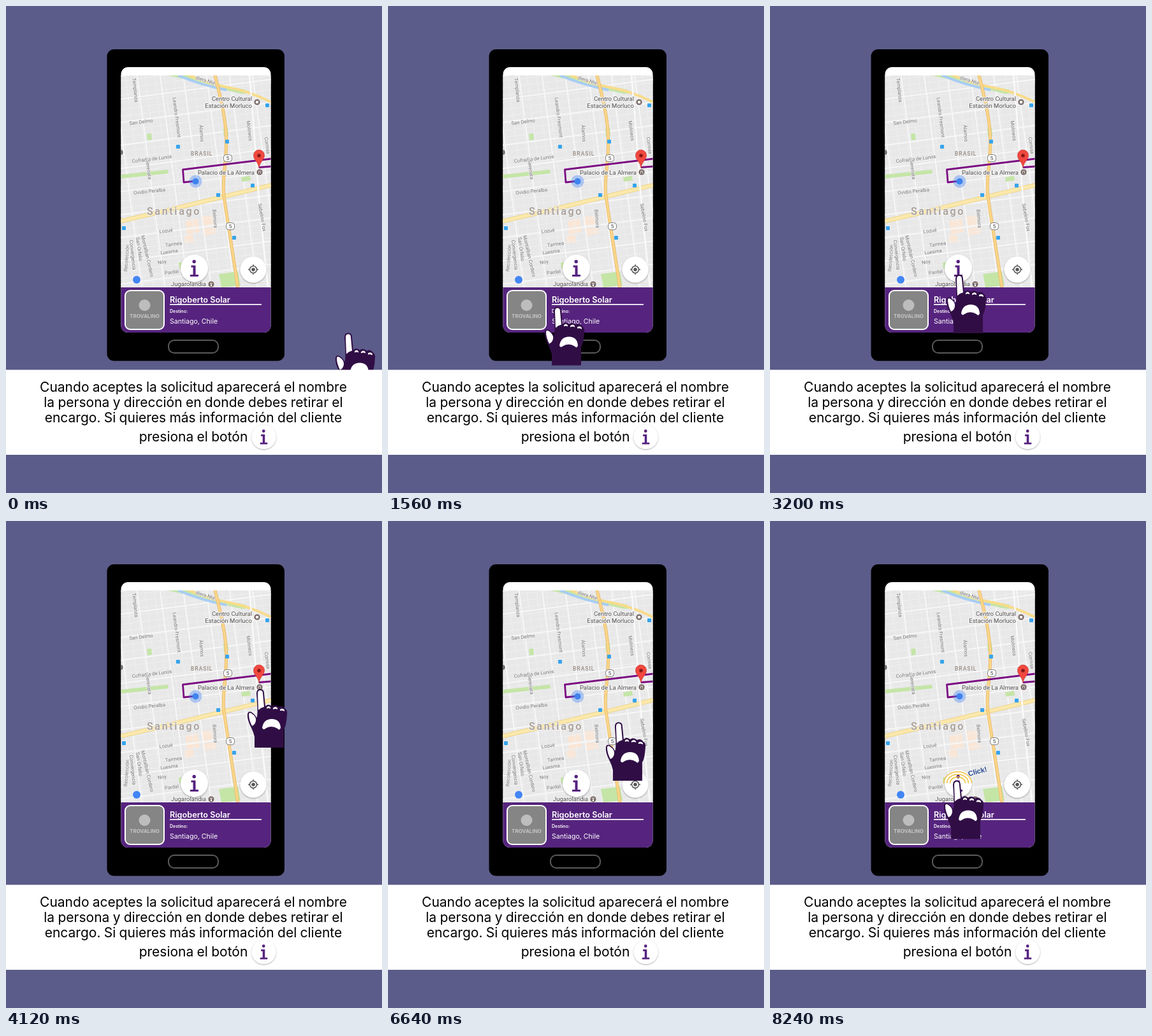
An HTML page that plays this animation: 590x765 px, repeating every 8520 ms.

```html
<!DOCTYPE html>
<html lang="es">
<head>
<meta charset="utf-8">
<style>
html, body { margin: 0; height: 100%; overflow: hidden; background: #5c5c8a; }
svg { display: block; width: 590px; height: 765px; }
text { font-family: Inter, sans-serif; }
.mid, #labels text { text-anchor: middle; }
#labels text, .poi text { font-family: Roboto, sans-serif; }
#labels text { font-size: 7.8px; fill: #77777a; stroke: #f1f1f1; stroke-width: 1.5px; paint-order: stroke; }
.poi text { font-size: 9.5px; fill: #55504f; text-anchor: end; stroke: #f3f3f3; stroke-width: 2px; paint-order: stroke; }
.line { fill: none; }
</style>
</head>
<body>
<svg viewBox="0 0 590 765">
  <defs>
    <clipPath id="screen"><rect x="180.5" y="96" width="235" height="417" rx="11"/></clipPath>
    <clipPath id="mapArea"><rect x="180" y="109" width="236" height="333"/></clipPath>
    <filter id="shadow" x="-30%" y="-30%" width="160%" height="160%">
      <feDropShadow dx="0" dy="1" stdDeviation="1.3" flood-opacity=".4"/>
    </filter>
    <g id="info">
      <circle r="21.5" fill="#fff" filter="url(#shadow)"/>
      <path d="M-5-4.500H2V10H6.500V13H-6.500V10H-2V-1.500H-5z" fill="#56217f"/>
      <circle cx="-.3" cy="-10.500" r="2.700" fill="#56217f"/>
    </g>
    <path id="highway" d="M327 105C335 138 344 170 345.500 205S339 275 341.500 295 349 345 353 371 360 415 364 444"/>
    <path id="avenue" d="M180 338L250 321.500 335 301 416 281.500"/>
  </defs>
  <rect width="590" height="765" fill="#5c5c8a"/>
  <rect x="158.5" y="68" width="278.5" height="489.5" rx="11"/>
  <rect class="line" x="255" y="525" width="78" height="20" rx="9" stroke="#5a5a5a" stroke-width="2"/>

  <g clip-path="url(#screen)">
    <rect x="180" y="96" width="236" height="418" fill="#fff"/>
    <g clip-path="url(#mapArea)">
      <rect x="180" y="109" width="236" height="333" fill="#e8e8e9"/>
      <g fill="#fae6d6">
        <path d="M281 337l20-4 3 22-20 4zM306 331l20-3 3 17-20 4zM309 350l20-3 2 10-20 4zM279 361l14-2 2 12-14 2z"/>
      </g>
      <path id="minor" class="line" stroke="#efefef"/>
      <path id="major" class="line" stroke="#f8f8f8" stroke-width="1.8"/>
      <g fill="#c5e5a7">
        <path d="M254 109h34l58 18 28 4 10 6-14 1-30-7-42-12zM180 265l74-8 1 6-75 8zM221 201l7-1 1 10-7 1zM341 193l7-1 1 12-7 1zM334 421l30-4 4 22-30 3zM271 403l9-1 1 9-9 1zM369 269l14-2 1 7-14 2z"/>
      </g>
      <path class="line" d="M270 109Q305 124 346 132" stroke="#a8cdf5" stroke-width="4"/>
      <g class="line">
        <path d="M276 103Q310 121 345 127T416 151" stroke="#f8dc8b" stroke-width="4"/>
        <use href="#avenue" stroke="#edd58c" stroke-width="7"/>
        <use href="#avenue" stroke="#fbe8ac" stroke-width="5"/>
        <use href="#highway" stroke="#e9b95f" stroke-width="5"/>
        <use href="#highway" stroke="#fad58b" stroke-width="3.4"/>
        <path d="M382 109Q389 190 393 250T411 442" stroke="#fafafa" stroke-width="2.5"/>
      </g>
      <circle cx="179.5" cy="230" r="4" fill="#66605f"/>
      <g id="stations" fill="#36a4ed"></g>
      <g id="labels"></g>
      <g class="mid" font-size="8" fill="#444">
        <g fill="#fff" stroke="#777"><rect x="341.5" y="233.5" width="13" height="11" rx="4"/><rect x="345.5" y="340.5" width="13" height="11" rx="4"/></g>
        <text x="348" y="242">5</text><text x="352" y="349">5</text>
      </g>
      <text x="290" y="235" style="font:500 8.5px Roboto,sans-serif;letter-spacing:1px" fill="#998b80">BRASIL</text>
      <text x="221" y="328" style="font:500 16px Roboto,sans-serif;letter-spacing:2.7px" fill="#a79d95" stroke="#eee" stroke-width="2" paint-order="stroke">Santiago</text>
      <path class="line" d="M297 275L279 277 277.500 257 416 240M397 253.500L416 252" stroke="#7b0b82" stroke-width="2.8" stroke-linejoin="round"/>
      <g class="poi">
        <text x="386" y="149">Centro Cultural</text><text x="386" y="160">Estación Morluco</text>
        <text x="390" y="264.5">Palacio de La Almera</text><text x="314" y="440">Jugarolandia</text>
        <g fill="#7b6c68" stroke="#fff" stroke-width=".7"><circle cx="394" cy="151" r="5"/><circle cx="398" cy="261" r="5"/><circle cx="322" cy="437" r="5"/></g>
        <path d="M392 149h4v4h-4zM396 259h4v1h-4zM396 261h1v2h-1zM399 261h1v2h-1zM320 435h4v1h-4zM321 437h2v3h-2z" fill="#fff"/>
      </g>
      <circle cx="297.5" cy="275.5" r="10" fill="#4285f4" opacity=".38"/>
      <circle cx="297.5" cy="275.5" r="5" fill="#3f83ee"/>
      <path d="M397 254C396 245 388.500 242 388.500 234.500a8.500 8.500 0 0 1 17 0C405.500 242 398 245 397 254z" fill="#f0483f" stroke="#ca3530" stroke-width=".7"/>
      <circle cx="397" cy="235" r="2.8" fill="#861817"/>
      <circle cx="205" cy="430" r="6" fill="#4285f4"/>
    </g>

    <rect x="180" y="442" width="236" height="72" fill="#56247e"/>
    <rect x="187" y="447" width="61" height="61" rx="8" fill="#858585" stroke="#fff" stroke-width="2"/>
    <circle cx="217.5" cy="470" r="9" fill="#bdbdbd"/>
    <text class="mid" x="217.5" y="490" font-size="8" font-weight="700" fill="#c4c4c4">TROVALINO</text>
    <g fill="#fff">
      <text x="257" y="466" font-size="12.7" font-weight="600">Rigoberto Solar</text>
      <rect x="257" y="468" width="144" height="1.7"/>
      <text x="257" y="482" font-size="7" font-weight="600">Destino:</text>
      <text x="257" y="499" font-size="10.6">Santiago, Chile</text>
    </g>
    <use href="#info" transform="translate(295.5 412)"/>
    <circle cx="388" cy="414" r="20.5" fill="#fff" filter="url(#shadow)"/>
    <path class="line" d="M388 406v2.500M388 419.500v2.500M380 414h2.500M393.500 414h2.500M393.500 414a5.500 5.500 0 1 1-11 0 5.500 5.500 0 1 1 11 0" stroke="#555" stroke-width="1.5"/>
    <circle cx="388" cy="414" r="2.8" fill="#555"/>
  </g>

  <g id="click">
    <path class="line" d="M-22 0A22 18 0 0 1 22 0M-17 0A17 14 0 0 1 17 0M-12 0A12 10 0 0 1 12 0" stroke="#f0c243" stroke-width="1.5"/>
    <text class="mid" transform="translate(32 -15) rotate(-15)" style="font:bold 11px 'Liberation Sans',sans-serif" fill="#2b4b98">Click!</text>
  </g>

  <g id="hand">
    <path d="M-6 7Q-6 0 0 0T6 7L8 27Q12 22 18 27 23 23 29 28 35 25 39 31 43 33 42 40 41 58 37 63V92H-9V75Q-11 67-14 61-21 48-20 39-19 34-14 36-8 40-6 45-3 44-6 7z" fill="#300e45"/>
    <g fill="#fff">
      <path d="M-4 7Q-4 2 0 2T4 7L6 28Q1 29-3 33z"/>
      <path d="M-18 40Q-18 36-14 38-6 43-7 50-8 56-13 58-18 48-18 40z"/>
      <path d="M10 29q3-4 6 0v2q-3-2-6 0zM20 30q4-4 7 0v2q-3-2-7 0zM31 32q4-3 7 1v2q-3-2-7-1z"/>
      <path d="M3 61Q5 47 18 47T32 61Q30 66 27 62 17 56 8 62 5 65 3 61z"/>
    </g>
  </g>

  <rect y="571.5" width="590" height="133.5" fill="#fff"/>
  <g class="mid" font-size="21" word-spacing="-.6">
    <text x="294" y="606">Cuando aceptes la solicitud aparecerá el nombre</text>
    <text x="294" y="630">la persona y dirección en donde debes retirar el</text>
    <text x="294" y="654">encargo. Si quieres más información del cliente</text>
    <text x="294" y="684">presiona el botón</text>
  </g>
  <use href="#info" transform="translate(404.5 677) scale(.885)"/>
</svg>
<script>
const $ = id => document.getElementById(id);
const LOOP = 8520, STEP = 40;

// Street grid, turned slightly anticlockwise
function grid(id, dx, dy) {
  let d = '';
  for (let x = 120; x < 480; x += dx) d += `M${x} 60V480`;
  for (let y = 60; y < 480; y += dy) d += `M120 ${y}H480`;
  $(id).setAttribute('d', d);
  $(id).setAttribute('transform', 'rotate(-7.5 298 275)');
}
grid('minor', 15, 11);
grid('major', 36, 36);

const labels = [
  ['Templanza', 203, 132, 84], ['Leandro Fresmont', 268, 175, 83], ['San Delmo', 212, 182, -7],
  ['Cofradía de Lunos', 229, 240, -7], ['Serenata', 224, 257, 83], ['Ovidio Peralba', 225, 291, -6],
  ['Álamos', 307, 200, 85], ['Molineos', 382, 196, 83], ['Cornisa', 410, 219, 82],
  ['Sebelino Fox', 402, 332, 80], ['Belmora', 328, 334, 85], ['Lozué', 251, 353, -8],
  ['Tarmea', 263, 374, -8], ['Luesma', 256, 386, -8], ['Noy', 245, 402, -8],
  ['Pardal', 260, 418, -8], ['Recolección', 189, 396, -86], ['Convergencia', 199, 391, 84],
  ['San Orfelio', 209, 382, 82], ['Montalbán Cordero', 222, 393, 77], ['diera Nte.', 314, 117, 17]
];
$('labels').innerHTML = labels.map(([name, x, y, turn]) =>
  `<text transform="translate(${x} ${y}) rotate(${turn})" y="2.7">${name}</text>`).join('');

const stations = [[270, 221], [347, 213], [410, 156], [333, 297], [387, 282], [185, 349], [358, 364]];
$('stations').innerHTML = stations.map(([x, y]) =>
  `<rect x="${x - 3}" y="${y - 3}" width="6" height="6" rx="1"/>`).join('');

// Fingertip path: time, x, y
const path = [
  [120, 537, 513.5], [1000, 361, 512.5], [1560, 266, 472.5], [1880, 255, 472.5], [2320, 290, 472.5],
  [2900, 264, 473], [3200, 297, 422], [4120, 399, 264], [6080, 399, 264], [7680, 293, 412.5],
  [7880, 293, 412.5], [8240, 293, 407.5]
];

function tip(t) {
  if (t <= path[0][0]) return path[0].slice(1);
  const i = path.findIndex(p => p[0] >= t);
  if (i < 0) return path[path.length - 1].slice(1);
  const [t0, x0, y0] = path[i - 1], [t1, x1, y1] = path[i];
  const k = (t - t0) / (t1 - t0);
  return [x0 + (x1 - x0) * k, y0 + (y1 - y0) * k];
}

function draw(now) {
  const t = Math.floor(now % LOOP / STEP) * STEP;
  const [x, y] = tip(t);
  $('hand').setAttribute('transform', `translate(${x} ${y})`);
  const grow = Math.max(0, Math.min(1, (t - 7880) / 360));
  $('click').setAttribute('transform', `translate(294.5 412) scale(${grow})`);
  $('click').style.display = grow ? '' : 'none';
}

const start = performance.now();
function frame() {
  draw(performance.now() - start);
  requestAnimationFrame(frame);
}
frame();
</script>
</body>
</html>
```
